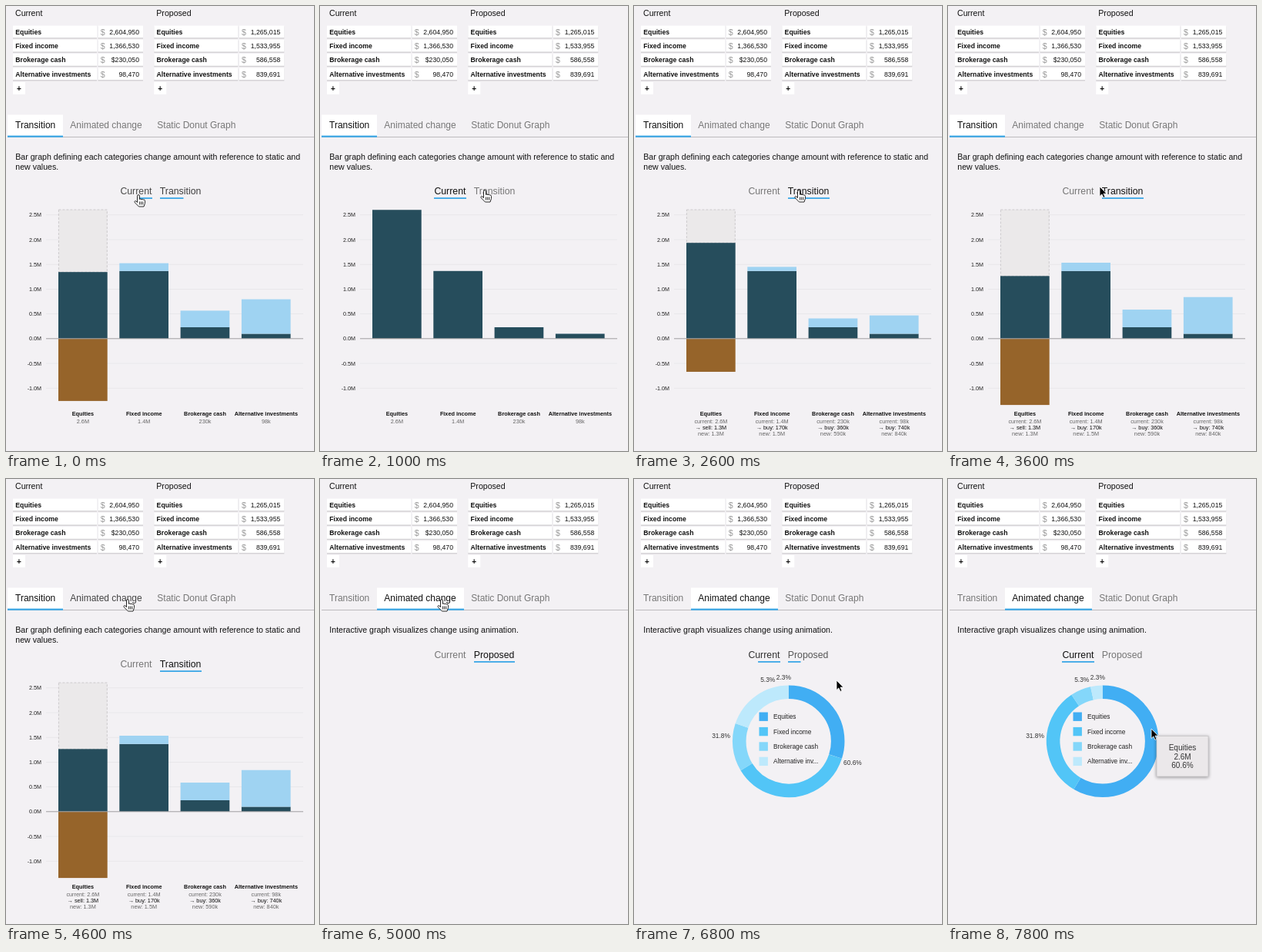
An HTML page for the animation above (8000 ms loop, 400 by 579 pixels).

```html
<!DOCTYPE html>
<html lang="en">
<head>
<meta charset="utf-8">
<title>Portfolio change</title>
<style>
  html, body { margin: 0; width: 100%; height: 100%; overflow: hidden; background: #f3f1f4; }
  svg { display: block; width: 400px; height: 579px; font-family: "Liberation Sans", Arial, sans-serif; }
  .tip { filter: drop-shadow(0 1px 2px #0006); }
</style>
</head>
<body>
<svg viewBox="0 0 400 579"><g id="base"></g><g id="view"></g></svg>
<script>
const LOOP = 8000, STEP = 200;
const SWITCH = 5000; // moment the second tab opens
const BLUE = '#3ba7e6', DARK = '#264d5c', SELL = '#96642a', BUY = '#9fd3f2';
const SHADES = ['#41aef3', '#52c5f7', '#84d7fa', '#bde9fc'];
const names = ['Equities', 'Fixed income', 'Brokerage cash', 'Alternative investments'];
const current = [2604950, 1366530, 230050, 98470];
const proposed = [1265015, 1533955, 586558, 839691];

const clamp = x => Math.min(1, Math.max(0, x));
const mix = (a, b, p) => a + (b - a) * p;
const smooth = x => (x = clamp(x), x * x * (3 - 2 * x));
const cubic = x => (x = clamp(x), x < .5 ? 4 * x ** 3 : 1 - 4 * (1 - x) ** 3);
const grey = v => `rgb(${v},${v},${v})`;

const rect = (x, y, w, h, fill, more = '') =>
  `<rect x="${x}" y="${y}" width="${Math.max(0, w)}" height="${Math.max(0, h)}" fill="${fill}" ${more}/>`;
const text = (s, x, y, size, fill = '#111', anchor = 'start', weight = 400) =>
  `<text x="${x}" y="${y}" font-size="${size}" fill="${fill}" text-anchor="${anchor}" font-weight="${weight}">${s}</text>`;
const short = v => {
  const digits = Number(v.toPrecision(2));
  return digits >= 1e6 ? (digits / 1e6).toFixed(1) + 'M' : digits / 1e3 + 'k';
};

function table(title, values, x) {
  const cell = (cx, y, w) => rect(cx, y + 1, w, 16, '#d2d0d3') + rect(cx, y, w, 15.6, '#fff');
  const rows = values.map((v, i) => {
    const y = 25.6 + i * 18.3, base = y + 11.2;
    const amount = (v === 230050 ? '$' : '') + v.toLocaleString('en-US');
    return cell(x, y, 109) + cell(x + 110.5, y, 58.5) + text(names[i], x + 3.3, base, 8.7, '#111', 'start', 700) +
      text('$', x + 113.7, base + .8, 10.6, '#999') + text(amount, x + 164, base, 8.7, '#111', 'end');
  });
  return text(title, x + 3, 12.5, 10.6) + rows.join('') +
    rect(x, 99, 16, 16, '#fff') + text('+', x + 7.8, 110.5, 10, '#111', 'middle', 700);
}

function tabs(active, hover) {
  const labels = [['Transition', 12], ['Animated change', 83.3], ['Static Donut Graph', 196.3]];
  const [x, w] = active ? [74, 113] : [2, 72];
  return rect(2, 170, 398, 1, '#bdbbbe') + rect(x, 141.5, w, 28, '#fff') + rect(x, 168.6, w, 2.2, BLUE) +
    labels.map(([s, tx], i) => text(s, tx, 159.3, 12, i === active ? '#111' : i === hover ? '#444' : '#777')).join('');
}

// share = 1 when the left option is chosen
function toggle(right, y, share) {
  const w = right === 'Transition' ? 54 : 53;
  return text('Current', 148.4, y, 12.3, grey(mix(118, 17, share))) +
    text(right, 199.8, y, 12.3, grey(mix(17, 118, share))) +
    rect(190 - 42 * share, y + 4.4, 42 * share, 1.8, BLUE) +
    rect(200, y + 4.4, w * (1 - share), 1.8, BLUE);
}

function barChart(p, detailed) {
  const zero = 432.8, scale = 64.4 / 1e6;
  let out = '';
  for (let m = -1; m <= 2.5; m += .5) {
    const y = zero - m * 64.4;
    out += rect(52, y - .4, 334, .8, '#e7e5e8') + text(m.toFixed(1) + 'M', 46, y + 2.6, 7.2, '#222', 'end');
  }
  names.forEach((name, i) => {
    const x = 68 + i * 79.3, w = 63.7, mid = x + 31.9;
    const top = zero - current[i] * scale;
    const shift = (proposed[i] - current[i]) * p * scale;
    if (shift < 0) {
      if (p > .01) out += rect(x + .4, top, w - .8, -shift, '#ebe9ea', 'stroke="#c4c2c4" stroke-width=".8" stroke-dasharray="3 2"');
      out += rect(x, top - shift, w, zero - top + shift, DARK) + rect(x, zero, w, -shift, SELL);
    } else {
      out += rect(x, top, w, zero - top, DARK) + rect(x, top - shift, w, shift, BUY);
    }
    const change = proposed[i] - current[i];
    const notes = detailed
      ? ['current: ' + short(current[i]), `→ ${change < 0 ? 'sell' : 'buy'}: ${short(Math.abs(change))}`, 'new: ' + short(proposed[i])]
      : [short(current[i])];
    out += text(name, mid, 533.4, 7.3, '#111', 'middle', 700) +
      notes.map((s, k) => text(s, mid, 542.5 + k * 8, 7.3, k === 1 ? '#111' : '#666', 'middle')).join('');
  });
  return out + rect(52, zero - .5, 334, 1, '#a3a1a4');
}

const shares = values => {
  const sum = values.reduce((a, b) => a + b);
  return values.map(v => v / sum);
};

function donut(sweep, p, labelShares) {
  const cx = 200.7, cy = 341.3, from = shares(proposed), to = shares(current);
  let out = '', start = 0, labelStart = 0;
  names.forEach((name, i) => {
    const part = mix(from[i], to[i], p) * sweep;
    out += `<circle cx="${cx}" cy="${cy}" r="64" fill="none" stroke="${SHADES[i]}" stroke-width="17.6" pathLength="1"
      stroke-dasharray="${part} 2" transform="rotate(${start * 360 - 90} ${cx} ${cy})"/>`;
    start += part;
    const angle = (labelStart + labelShares[i] / 2) * 2 * Math.PI;
    labelStart += labelShares[i];
    out += text((labelShares[i] * 100).toFixed(1) + '%', cx + 88 * Math.sin(angle), cy + 3 - 84 * Math.cos(angle), 8.4, '#333', 'middle');
    const y = 309.2 + i * 19.4;
    out += rect(162.5, y - 5.7, 11.4, 11.4, SHADES[i]) + text(i === 3 ? 'Alternative inv...' : name, 181, y + 3, 8.3, '#222');
  });
  return out;
}

function tooltip(x, y) {
  const lines = [names[0], short(current[0]), '60.6%'];
  return rect(x, y, 67, 52.5, '#ebe8ea', 'class="tip" stroke="#c8c6c8" stroke-width=".8"') +
    lines.map((s, i) => text(s, x + 33.5, y + 18.6 + i * 11.5, 10, '#333', 'middle')).join('');
}

// time, x, y of the pointer tip
const path = [
  [0, 172, 246], [900, 214, 240], [3000, 214, 240], [3600, 197, 235], [4200, 190, 200], [4600, 158, 157],
  [6000, 158, 157], [6400, 170, 227], [6600, 172, 229], [6800, 263, 262], [7200, 263, 262], [7800, 264, 325]
];

function pointerAt(t) {
  const k = path.findIndex(point => point[0] > t);
  if (k < 0) return path.at(-1).slice(1);
  const [t0, x0, y0] = path[k - 1], [t1, x1, y1] = path[k];
  const p = smooth((t - t0) / (t1 - t0));
  return [mix(x0, x1, p), mix(y0, y1, p)];
}

const ARROW = '<path d="M0 0V12.5l2.9-2.6 2 4.5 2.1-.9-2-4.4H9z" fill="#000" stroke="#fff" stroke-width=".8"/>';
const HAND = `<g stroke="#111" stroke-width=".9" stroke-linejoin="round">
  <path fill="#fff" d="M-1.5 9V1.2a1.5 1.5 0 0 1 3 0V5.5q1.3-1 2.5.2 1.2-.8 2.4.3 2-.4 2.1 1.5V10.5l-1.5 4.5h-6.5L-4.6 9.8q-1-1.8.3-2.2 1-.3 2.8 2z"/>
  <path d="M1.6 8.5v4m2.1-4v4m2.1-4v4"/></g>`;

function pointer(x, y) {
  const onTab = y > 142 && y < 171 && x < 310;
  const onToggle = y > 216 && y < 252 && x > 147 && x < 255 && (x < 190 || x > 199);
  return `<g transform="translate(${x} ${y})">${onTab || onToggle ? HAND : ARROW}</g>`;
}

function scene(t) {
  const [x, y] = pointerAt(t);
  let out;
  if (t < SWITCH) {
    const back = t < 1900;
    const share = back ? smooth((t + 160) / 350) : 1 - smooth((t - 1900) / 350);
    const p = back ? 1 - cubic((t + 370) / 1500) : cubic((t - 1850) / 1500);
    out = tabs(0, y < 171 ? 1 : -1) +
      text('Bar graph defining each categories change amount with reference to static and', 12.3, 199.8, 10.6) +
      text('new values.', 12.3, 212.5, 10.6) +
      toggle('Transition', 244.8, share) + barChart(p, !back);
  } else {
    const share = smooth((t - 6580) / 350);
    out = tabs(1, -1) + text('Interactive graph visualizes change using animation.', 12.3, 199.8, 10.6) +
      toggle('Proposed', 232.6, share);
    if (t > SWITCH) {
      out += donut(cubic((t - 4800) / 1200), cubic((t - 6680) / 1500), shares(share > 0 ? current : proposed));
    }
    if (t > 7200 && y > 304) out += tooltip(x + 7, y + 9.5);
  }
  return out + pointer(x, y);
}

document.getElementById('base').innerHTML = table('Current', current, 9) + table('Proposed', proposed, 192.3);
const view = document.getElementById('view');
let shown = -1;
function tick() {
  const t = Math.floor(performance.now() % LOOP / STEP) * STEP;
  if (t !== shown) view.innerHTML = scene(shown = t);
  requestAnimationFrame(tick);
}
tick();
</script>
</body>
</html>
```
